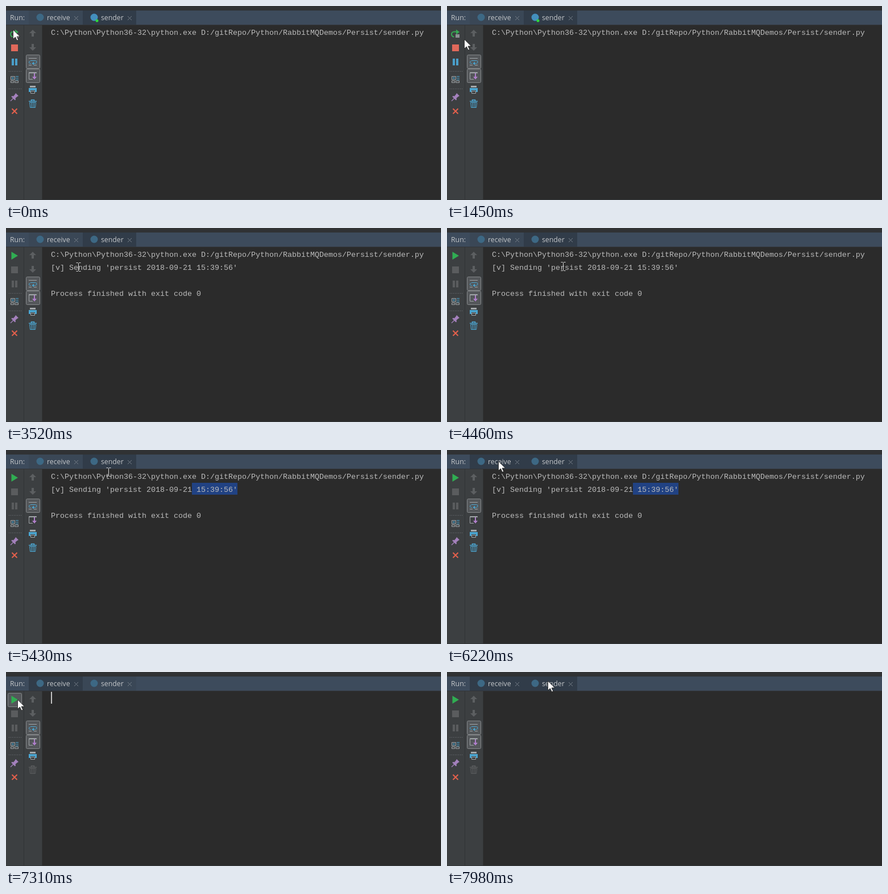
Write an HTML page that moves like this. It is 765x343 px and loops after 8 s.

```html
<!DOCTYPE html>
<html lang="en">
<head>
<meta charset="utf-8">
<title>Run console</title>
<style>
html, body { margin: 0; width: 100%; height: 100%; overflow: hidden; background: #2b2b2b; }
svg { display: block; width: 765px; height: 343px; }
.ui { font: 12.3px "Open Sans", "Noto Sans", sans-serif; fill: #c3c6c9; }
.log { font: 13.333px "Liberation Mono", monospace; fill: #bbbbbb; white-space: pre; }
.line { fill: none; stroke-width: 1; }
.gray { stroke: #a1a6a9; }
.blue { stroke: #4ba5d0; }
.dots { stroke: #70747a; stroke-dasharray: 1 2; }
.pressed { fill: #54575a; stroke: #85888a; }
</style>
</head>
<body>
<svg viewBox="0 0 765 343">
  <rect width="765" height="343" fill="#2b2b2b"/>
  <rect width="765" height="8" fill="#303234"/>
  <rect y="8" width="765" height="25" fill="#3d4b5c"/>
  <rect id="tabA" x="40" y="8" width="95" height="25"/>
  <rect id="tabB" x="135" y="8" width="94" height="25"/>
  <rect y="33" width="765" height="1" fill="#323539"/>
  <rect y="34" width="64" height="309" fill="#3c3f41"/>
  <path d="M31.5 34V343M63.5 34V343" stroke="#313335"/>
  <path d="M0 342.5H765" stroke="#353739"/>

  <g class="ui">
    <text x="7" y="25">Run:</text>
    <text x="72" y="25">receive</text>
    <text x="167" y="25">sender</text>
  </g>
  <circle cx="60" cy="20" r="6.5" fill="#3d6884"/>
  <circle id="badge" cx="155" cy="20" r="6.5"/>
  <circle id="live" cx="160" cy="26" r="2.5" fill="#2fd83b"/>
  <path d="M120 18l7 7m0-7l-7 7M214 18l7 7m0-7l-7 7" stroke="#747d87"/>

  <!-- left tool column -->
  <rect id="hover" class="pressed" x="3.5" y="37.5" width="24" height="24" rx="2"/>
  <g id="rerun">
    <path d="M12.5 54.5A4.5 4.5 0 0 1 12.5 45.5H17" fill="none" stroke="#35a853" stroke-width="2"/>
    <path d="M16 41.5L22 46L16 50.5Z" fill="#35a853"/>
    <rect x="15" y="50" width="7" height="6" fill="#8b9093"/>
  </g>
  <path id="play" d="M9.5 42L21 49L9.5 56Z" fill="#30ad52"/>
  <rect id="stop" x="9" y="68" width="12" height="12"/>
  <path id="pause" d="M10 93h4v12h-4zM16 93h4v12h-4z"/>
  <path class="dots" d="M5 115.5H28M5 146.5H28"/>
  <g class="line">
    <path class="gray" d="M8.5 124.5h7v6h-7zM8.5 132.5h5v3h-5zM15.5 132.5h6v3h-6z"/>
    <path class="blue" d="M10 126.5h4M10 128.5h4M17 124.5h5M17 127.5h5M17 130.5h5"/>
  </g>
  <path d="M17 154l5 5l-2 1l-3.5 3l.5 3l-1.5.5l-6-6l.5-1.5l3 .5l3-3.500z" fill="#a481bd"/>
  <path d="M13 163l-5 5" stroke="#a481bd" stroke-width="1.3"/>
  <path d="M10.5 181.5l9 9m0-9l-9 9" stroke="#e2604c" stroke-width="2.1"/>

  <!-- right tool column -->
  <path d="M47 42l6 6h-4v6h-4v-6h-4zM47 79l6-6h-4v-6h-4v6h-4z" fill="#5c5f61"/>
  <rect class="pressed" x="35.5" y="86.5" width="24" height="24" rx="2"/>
  <g class="line">
    <path class="gray" d="M40 92.5H54M40 104.5h5M49 104.5h5"/>
    <path class="blue" d="M43 96.5H51.5a2.5 2.5 0 0 1 0 5H48M42.5 97.5a2 2 0 0 0 0 4H44"/>
  </g>
  <path d="M49 98.5v6l-3.500-3z" fill="#4ba5d0"/>
  <rect id="follow" class="pressed" x="35.5" y="111.5" width="24" height="24" rx="2"/>
  <path class="line gray" d="M47 129.5H40.5V117.5H53.5V119M40 118.5H54"/>
  <path d="M49 119h2v6h3l-4 5l-4-5h3z" fill="#b07fcb"/>
  <path d="M42 141h10v3H42z" fill="#a4a9ac"/>
  <path d="M40 145h14v7h-3v-3h-8v3h-3z" fill="#4ba5d0"/>
  <path class="line gray" d="M43.5 150.5h7v4h-7z"/>
  <g id="trash" class="line">
    <path d="M40 168.5H54M44.5 168v-2h5v2" stroke-width="1.5"/>
    <path d="M41.5 170.5H52.5L51.5 179.5H42.500ZM44.500 171v8M47 171v8M49.500 171v8"/>
  </g>

  <rect id="mark" y="58" height="21" fill="#214283"/>
  <g class="log">
    <text id="command" x="79" y="51">C:\Python\Python36-32\python.exe D:/gitRepo/Python/RabbitMQDemos/Persist/sender.py</text>
    <text id="sent" x="79" y="74">[v] Sending 'persist 2018-09-21 15:39:56'</text>
    <text id="done" x="79" y="120">Process finished with exit code 0</text>
  </g>
  <rect id="caret" x="79" y="35" width="2" height="21" fill="#c4c4c4"/>

  <path id="arrow" d="M0 0V16.5L3.9 12.9L6.8 19L9.2 17.9L6.5 12H12Z" fill="#fff" stroke="#1c1c1c" stroke-width=".8"/>
  <path id="beam" d="M-4 -7.5H-1L0 -6.5L1 -7.5H4M0 -6.5V6.5M-4 7.5H-1L0 6.5L1 7.5H4" fill="none" stroke="#d8d8d8"/>
</svg>
<script>
const LOOP = 8000, STEP = 136.6, PHASE = 2375;   // the screen is sampled every STEP ms
const PRESS = 4860, RELEASE = 5130, SWITCH = 6340;
const LEFT = 79, CHAR = 8, LINE_END = 407;
const BLINK = 480;
const DIM = '#5a5c5e', TAB = '#313c49', TAB_IDLE = '#3a4756';

// where the pointer turns or rests
const route = [
  { t: 0, x: 12, y: 42 },
  { t: 270, x: 30, y: 53 },
  { t: 1400, x: 30, y: 59 },
  { t: 2090, x: 240, y: 195 },
  { t: 2380, x: 240, y: 195 },
  { t: 2800, x: 373, y: 75 },
  { t: 3650, x: 94, y: 68 },
  { t: 3930, x: 200, y: 35 },
  { t: 4200, x: 352, y: 106 },
  { t: 4420, x: 204, y: 68 },
  { t: PRESS, x: 442, y: 69 },
  { t: RELEASE, x: 327, y: 69 },
  { t: 5560, x: 90, y: 20 },
  { t: 6890, x: 90, y: 20 },
  { t: 7290, x: 20, y: 49 },
  { t: 7440, x: 1, y: 51 },
  { t: 7830, x: 94, y: 22 },
  { t: 7970, x: 177, y: 16 }
];

const $ = id => document.getElementById(id);
const show = (id, on) => $(id).setAttribute('visibility', on ? 'visible' : 'hidden');
const fill = (id, color) => $(id).setAttribute('fill', color);

function pointer(time) {
  const next = route.findIndex(p => p.t > time);
  if (next < 0) return route[route.length - 1];
  const a = route[next - 1], b = route[next];
  const u = (time - a.t) / (b.t - a.t);
  const k = u * u * (3 - 2 * u);
  return { x: Math.round(a.x + (b.x - a.x) * k), y: Math.round(a.y + (b.y - a.y) * k) };
}

function render(time) {
  const frame = Math.floor((time - PHASE) / STEP);
  const t = Math.max(0, PHASE + frame * STEP);
  const { x, y } = pointer(t);
  const inside = (x0, y0, x1, y1) => x >= x0 && x < x1 && y >= y0 && y < y1;
  const running = time < 1850;
  const sender = time < SWITCH;

  fill('tabA', !sender || inside(40, 8, 135, 33) ? TAB : TAB_IDLE);
  fill('tabB', sender || inside(135, 8, 229, 33) ? TAB : TAB_IDLE);
  fill('badge', running ? '#438fbd' : '#3d6884');
  show('live', running);

  show('rerun', running);
  show('play', !running);
  fill('stop', running ? '#e0695a' : DIM);
  fill('pause', time < PHASE ? '#4a9fca' : DIM);
  show('hover', t > 0 && inside(3, 37, 28, 62));
  show('follow', time < PRESS || !sender);
  $('trash').setAttribute('stroke', sender ? '#4ba5d0' : DIM);

  show('command', sender);
  show('sent', sender && time >= 1710);
  show('done', sender && time >= 1850);
  show('caret', !sender && Math.floor((time - SWITCH) / BLINK) % 2 === 0);

  // dragging back from the line end selects whole characters
  const column = Math.round((pointer(Math.min(t, RELEASE)).x - LEFT) / CHAR);
  const edge = Math.min(LINE_END, LEFT + column * CHAR);
  show('mark', t >= PRESS && sender);
  $('mark').setAttribute('x', edge);
  $('mark').setAttribute('width', LINE_END - edge);

  const overText = x >= 64 && y >= 34;
  show('arrow', !overText);
  show('beam', overText);
  $(overText ? 'beam' : 'arrow').setAttribute('transform', `translate(${x + .5} ${y})`);
}

const start = performance.now();
function tick() {
  render((performance.now() - start) % LOOP);
  requestAnimationFrame(tick);
}
tick();
</script>
</body>
</html>
```
